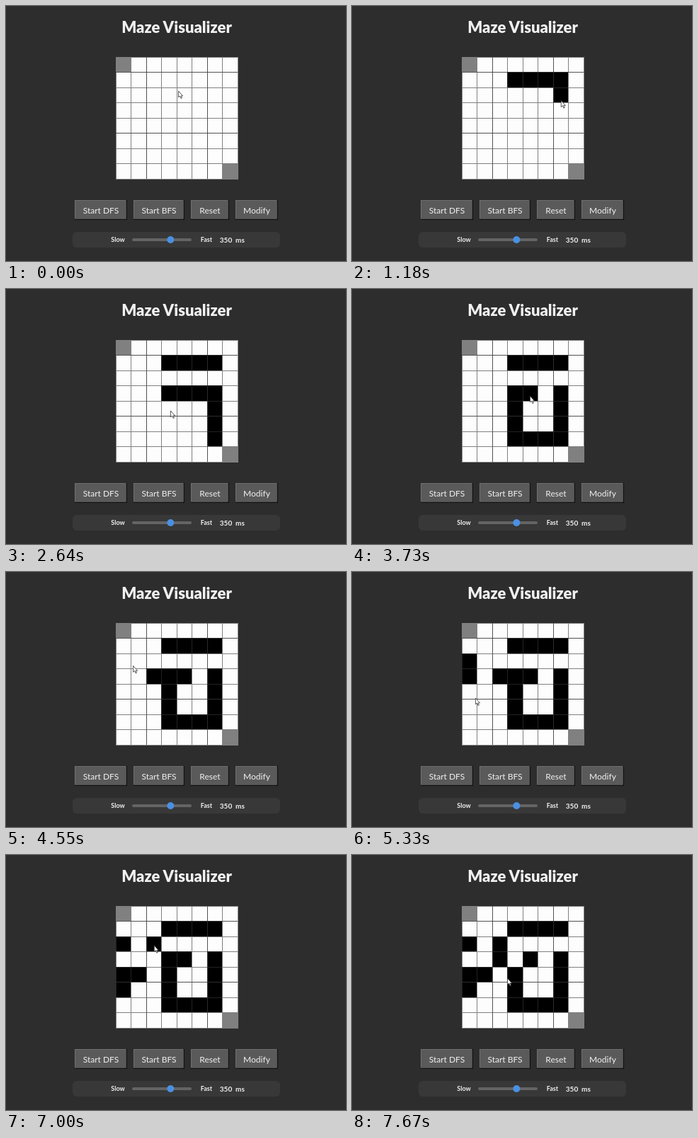
These frames come from a looping animation (480 px wide and 360 px high, 7.7 s). An HTML page:

```html
<!DOCTYPE html>
<html>
<head>
<meta charset="utf-8">
<style>
  html, body { margin: 0; width: 100%; height: 100%; overflow: hidden; background: #2d2d2e; }
  svg { display: block; }
  text { font-family: Lato, "Open Sans", sans-serif; fill: #f0f0f0; text-anchor: middle; }
  .small { font-size: 9px; font-weight: 700; }
  .value { font-size: 10px; font-weight: 700; }
</style>
</head>
<body>
<svg width="480" height="360" viewBox="0 0 480 360">
  <text x="241" y="38" font-size="22" font-weight="900">Maze Visualizer</text>
  <g id="grid"></g>
  <path d="M198.5 72V244M284.5 72V244M155 93.5H327M155 179.5H327" stroke="#333" stroke-opacity=".6"/>
  <g id="buttons"></g>
  <rect x="94" y="319" width="293" height="22" rx="6" fill="#383838"/>
  <text class="small" x="158" y="333">Slow</text>
  <rect x="178" y="328" width="84" height="4" rx="2" fill="#646464"/>
  <circle cx="232.3" cy="330" r="5" fill="#4a90e2"/>
  <text class="small" x="283" y="333">Fast</text>
  <text class="value" x="310.5" y="334">350</text>
  <text class="value" x="330.5" y="334">ms</text>
  <path id="cursor" d="M.5 0V9L2.5 7L4 10.5L5.5 10L4 7H6.6Z" fill="#fff" stroke="#333" stroke-width=".8"/>
</svg>
<script>
const LOOP = 7700, N = 8, CELL = 21.5, LEFT = 155, TOP = 72, STEP = 140;
const byId = id => document.getElementById(id);

function add(parent, tag, attrs, text = '') {
  const el = document.createElementNS('http://www.w3.org/2000/svg', tag);
  for (const key in attrs) el.setAttribute(key, attrs[key]);
  el.textContent = text;
  return parent.appendChild(el);
}

const route = [];
const rest = (t, x, y) => route.push({ t, x, y });

// Toggles every cell on a straight line, one per STEP
function drag(t, c, r, c1 = c, r1 = r) {
  const count = Math.max(Math.abs(c1 - c), Math.abs(r1 - r));
  for (let i = 0; i <= count; i++) {
    const col = c + Math.sign(c1 - c) * i, row = r + Math.sign(r1 - r) * i;
    route.push({
      t: t + i * STEP, cell: row * N + col,
      x: LEFT + (col + .5) * CELL, y: TOP + (row + .5) * CELL
    });
  }
}

rest(0, 243, 120);
drag(500, 3, 1, 6, 1);
drag(1130, 6, 2, 6, 6);
drag(1960, 6, 2);
drag(2120, 5, 3, 3, 3);
rest(2640, 232, 172);
drag(2700, 3, 4, 3, 6);
drag(3110, 4, 6, 5, 6);
drag(3530, 5, 3);
rest(3730, 251, 151);
drag(4040, 2, 3);
drag(4780, 0, 2, 0, 3);
rest(5330, 174, 178);
drag(5420, 0, 4, 0, 5);
drag(5920, 2, 3);
drag(6200, 1, 4);
rest(6300, 185, 176);
drag(6560, 0, 3);
drag(6980, 2, 2);
drag(7220, 2, 3);
drag(7430, 3, 3);
rest(7670, 219, 174);
rest(LOOP, 219, 174);

const edge = i => Math.floor(i * CELL);
const cells = [];
for (let r = 0; r < N; r++)
  for (let c = 0; c < N; c++)
    cells.push(add(byId('grid'), 'rect', {
      x: LEFT + edge(c) + .5, y: TOP + edge(r) + .5,
      width: edge(c + 1) - edge(c), height: edge(r + 1) - edge(r)
    }));

function button(label, x, w) {
  const g = byId('buttons');
  const box = (x, y, width, height, fill) => add(g, 'rect', { x, y, width, height, fill });
  box(x, 274, w, 28, '#111');
  box(x, 274, w - 1.5, 26.5, '#707070');
  box(x + 1, 275, w - 2.5, 25.5, '#5a5a5a');
  add(g, 'text', { x: x + w / 2, y: 292.5, 'font-size': 12 }, label);
}
button('Start DFS', 97, 74);
button('Start BFS', 180, 72);
button('Reset', 261, 54);
button('Modify', 324, 60);

function paintCells(t) {
  const walls = new Set();
  for (const p of route)
    if (p.cell !== undefined && p.t <= t && !walls.delete(p.cell)) walls.add(p.cell);
  cells.forEach((el, i) => {
    const wall = walls.has(i), end = i === 0 || i === N * N - 1;
    el.setAttribute('fill', wall ? '#000' : end ? '#808080' : '#fdfdfd');
    el.setAttribute('stroke', wall ? '#222' : '#808080');
  });
}

function moveCursor(t) {
  const k = route.findIndex(p => p.t > t), a = route[k - 1], b = route[k];
  const u = (t - a.t) / (b.t - a.t);
  byId('cursor').setAttribute('transform', `translate(${a.x + (b.x - a.x) * u} ${a.y + (b.y - a.y) * u})`);
}

const start = performance.now();
function frame() {
  const t = Math.max(0, performance.now() - start) % LOOP;
  paintCells(t);
  moveCursor(t);
  requestAnimationFrame(frame);
}
frame();
</script>
</body>
</html>
```
